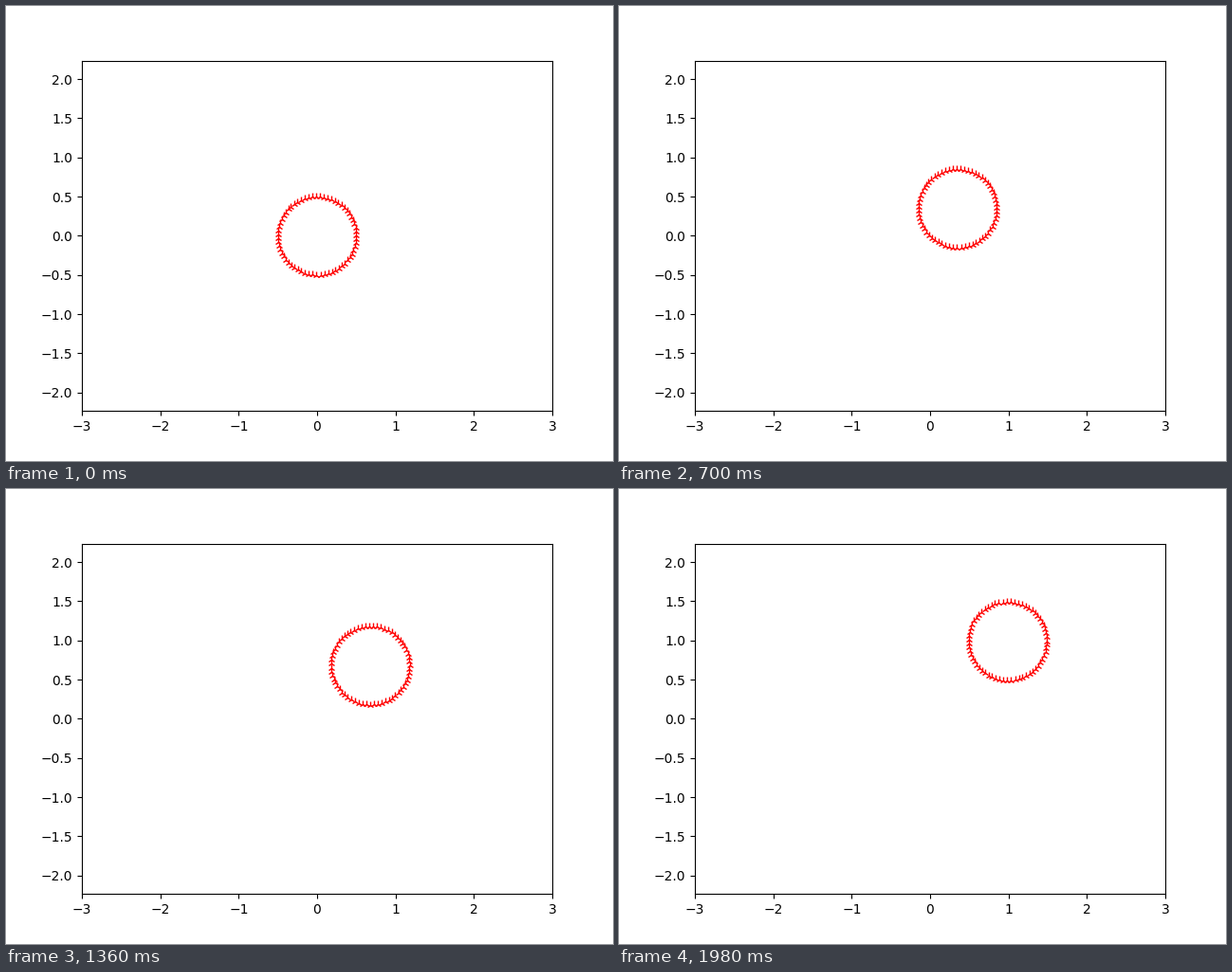
Write a matplotlib script that moves like this. It is 640 by 480 pixels and loops after 2 s.

```python
import numpy as np
import matplotlib.pyplot as plt
from matplotlib.animation import FuncAnimation

FRAMES = 100
RADIUS = 0.5

fig, ax = plt.subplots(figsize=(6.4, 4.8), dpi=100)

# Equal scale on both axes for the default subplot box
half_w = 3
half_h = half_w * (0.77 * 4.8) / (0.775 * 6.4)
ax.set_xlim(-half_w, half_w)
ax.set_ylim(-half_h, half_h)

theta = np.arange(0, 2 * np.pi, 0.1)
circle_x = RADIUS * np.cos(theta)
circle_y = RADIUS * np.sin(theta)
ring, = ax.plot(circle_x, circle_y, "r2")


def update(i):
    shift = i / FRAMES
    ring.set_data(circle_x + shift, circle_y + shift)
    return ring,


anim = FuncAnimation(fig, update, frames=FRAMES, interval=20,
                     repeat=True, repeat_delay=0)
plt.show()
```
